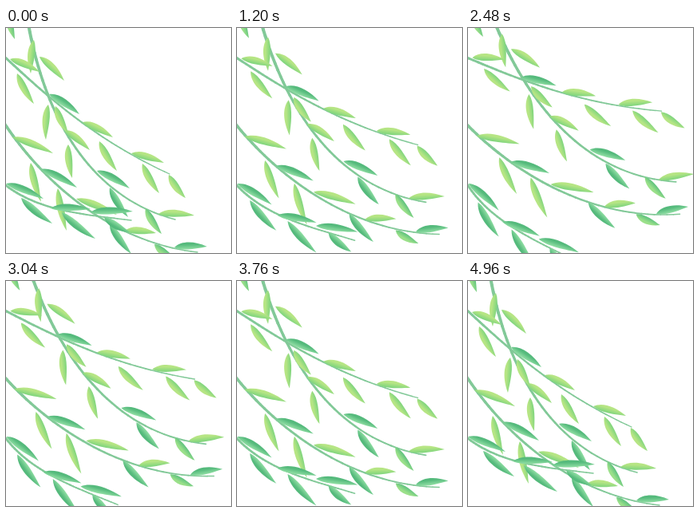
Animation of 282x282 px, one loop 5000 ms. Source, as an HTML page with a canvas:

```html
<!DOCTYPE html>
<html lang="en">
<head>
<meta charset="utf-8">
<title>Willow branches</title>
<style>
  html, body { margin: 0; width: 100%; height: 100%; overflow: hidden; background: #fff; }
  canvas { display: block; }
</style>
</head>
<body>
<canvas id="stage" width="282" height="282"></canvas>
<script>
const ctx = document.getElementById('stage').getContext('2d');
const LOOP = 5000, STEP = 40, HALF = 2480;
const STEM = '#82c998';
const light = ['#b6e584', '#83d67e'];
const fresh = ['#9be08a', '#63c47f'];
const dark = ['#55ba7c', '#8bdba0'];

// Each branch swings rigidly about its pivot; leaves run from base to tip.
const branches = [
  {
    pivot: [0, -28], swing: -11.4, width: [4.2, 1.6],
    stem: [24, -30, 40, 87, 91, 208, 212, 240],
    over: [
      [42, 36, 73, 66, light], [73, 128, 105, 153, light],
      [114, 179, 155, 201, dark], [191, 233, 236, 235, light]
    ],
    under: [
      [2, -22, 11, 14, fresh], [35, 15, 31, 57, light], [53, 96, 50, 140, light],
      [78, 146, 83, 188, light], [130, 200, 153, 237, dark], [175, 226, 195, 258, fresh]
    ]
  },
  {
    pivot: [0, 37], swing: -20, width: [3, 1.3],
    stem: [-4, 34, 58, 92, 116, 142, 205, 183],
    over: [
      [5, 39, 42, 55, light], [54, 83, 92, 108, dark],
      [96, 118, 134, 137, light], [157, 157, 198, 169, light]
    ],
    under: [
      [14, 57, 35, 95, light], [62, 98, 78, 132, light], [117, 142, 139, 179, light],
      [171, 170, 192, 207, light], [204, 184, 225, 213, light]
    ]
  },
  {
    pivot: [0, 122], swing: -10.8, width: [3.6, 1.5],
    stem: [-3, 118, 46, 193, 132, 269, 240, 281],
    over: [
      [8, 137, 59, 157, light], [44, 177, 89, 200, dark], [88, 214, 139, 234, light],
      [149, 254, 188, 257, light], [211, 275, 252, 274, dark]
    ],
    under: [
      [31, 169, 44, 218, light], [65, 201, 76, 254, light],
      [130, 245, 157, 283, dark], [186, 271, 213, 290, fresh]
    ]
  },
  {
    pivot: [0, 197], swing: 19.5, width: [2.8, 1.5],
    stem: [-3, 195, 40, 230, 100, 234, 157, 241],
    over: [
      [0, 195, 47, 214, dark], [56, 226, 106, 227, dark], [106, 231, 159, 230, dark]
    ],
    under: [
      [19, 213, 58, 245, dark], [70, 231, 112, 264, dark], [123, 237, 155, 256, dark]
    ]
  }
];

function drawStem([x0, y0, x1, y1, x2, y2, x3, y3], [thick, thin]) {
  const at = (t, a, b, c, d) => {
    const u = 1 - t;
    return u * u * u * a + 3 * u * u * t * b + 3 * u * t * t * c + t * t * t * d;
  };
  const count = 40;
  ctx.strokeStyle = STEM;
  ctx.lineCap = 'round';
  for (let i = 0; i < count; i++) {
    ctx.lineWidth = thick + (thin - thick) * i / count;
    ctx.beginPath();
    for (const t of [i / count, (i + 1) / count]) {
      ctx.lineTo(at(t, x0, x1, x2, x3), at(t, y0, y1, y2, y3));
    }
    ctx.stroke();
  }
}

// side is -1 for a leaf arching upward, 1 for one arching down and left.
function drawLeaf([x, y, tipX, tipY, [outer, inner]], side) {
  const length = Math.hypot(tipX - x, tipY - y);
  ctx.save();
  ctx.translate(x, y);
  ctx.rotate(Math.atan2(tipY - y, tipX - x));
  ctx.scale(1, side);
  const shade = ctx.createLinearGradient(0, 5, 0, -3);
  shade.addColorStop(0.2, outer);
  shade.addColorStop(0.9, inner);
  ctx.fillStyle = shade;
  ctx.beginPath();
  ctx.moveTo(0, 0);
  ctx.bezierCurveTo(length * 0.22, 8.5, length * 0.62, 7.5, length, 0);
  ctx.bezierCurveTo(length * 0.7, -2, length * 0.25, -5.5, 0, 0);
  ctx.fill();
  ctx.restore();
}

function draw(now) {
  const time = Math.floor(now % LOOP / STEP) * STEP;
  const phase = 1 - Math.abs(time - HALF) / HALF;
  ctx.clearRect(0, 0, 282, 282);
  for (const { pivot: [px, py], swing, width, stem, over, under } of branches) {
    ctx.save();
    ctx.translate(px, py);
    ctx.rotate(swing * phase * Math.PI / 180);
    ctx.translate(-px, -py);
    drawStem(stem, width);
    under.forEach(leaf => drawLeaf(leaf, 1));
    over.forEach(leaf => drawLeaf(leaf, -1));
    ctx.restore();
  }
}

let start;
function tick(now) {
  start ??= now;
  draw(now - start);
  requestAnimationFrame(tick);
}
draw(0);
requestAnimationFrame(tick);
</script>
</body>
</html>
```
